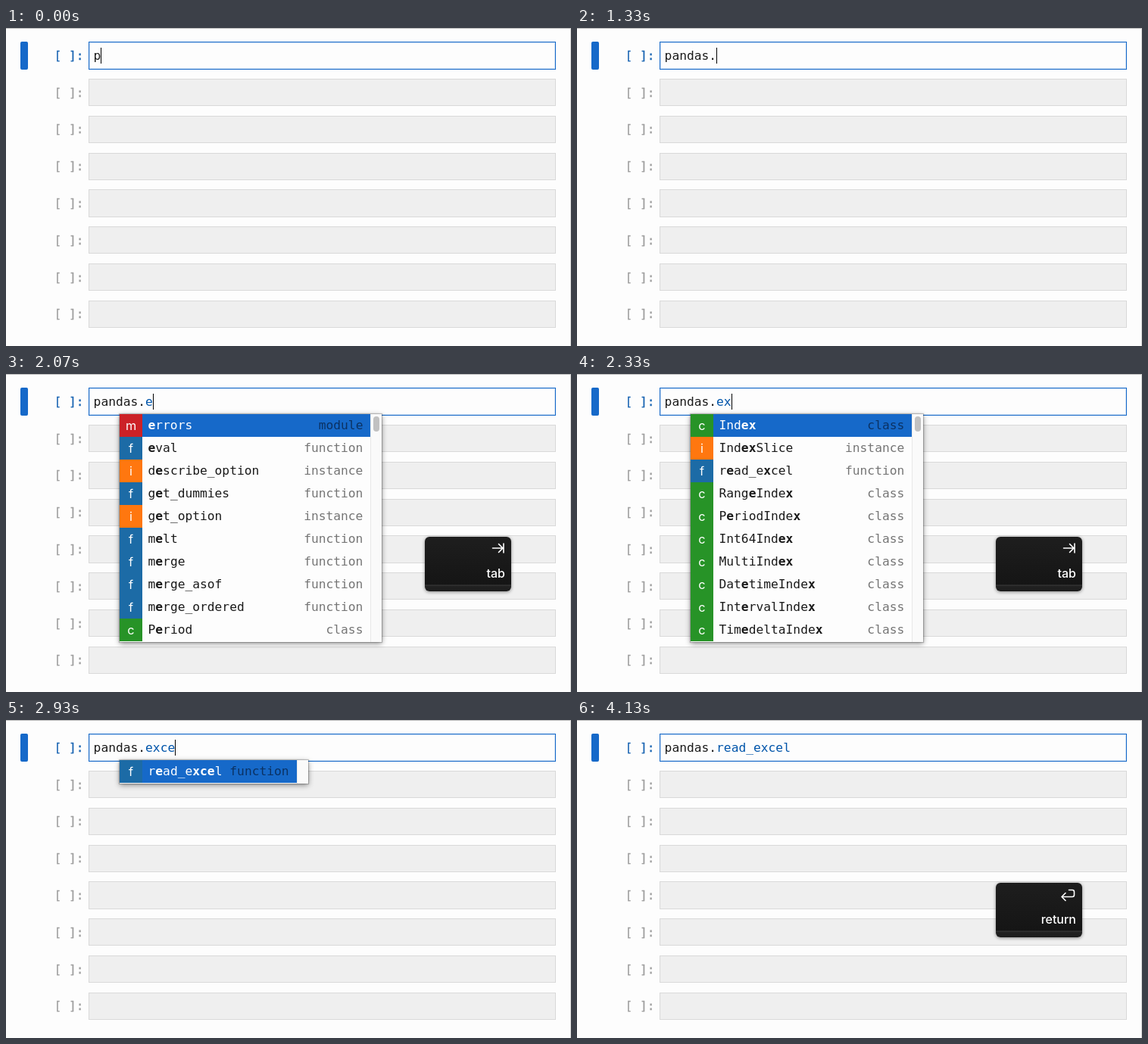
Recreate the animation shown at these times as an HTML page. Size 746 px wide and 420 px high, loop 4670 ms.

```html
<!DOCTYPE html>
<html lang="en">
<head>
<meta charset="utf-8">
<title>Notebook completion</title>
<style>
html, body { margin: 0; width: 100%; height: 100%; overflow: hidden; background: #fdfdfd; }
#stage { position: relative; width: 746px; height: 420px; overflow: hidden; box-sizing: border-box;
  border-top: 1px solid #bdbdbd; border-right: 1px solid #d2d2d2; color: #1a1a1a;
  font: 16.25px/37px "DejaVu Sans Mono", monospace; }
#stage div { position: absolute; box-sizing: border-box; white-space: nowrap; }
#scene { left: 0; top: -1px; width: 746px; height: 420px; }
#cells { left: 0; top: 0; }
.bar { left: 19px; top: 18px; width: 10px; height: 37px; border-radius: 2px; background: #1669c9; }
.prompt { left: 63.4px; color: #a0a0a0; -webkit-text-stroke: .3px; }
.cell { left: 109px; width: 617px; height: 36.2px; background: #efefef; border: 1px solid #d9d9d9; }
.prompt.active { color: #1f68b4; }
.cell.active { height: 37px; background: #fdfdfd; border-color: #1669c9;
  box-shadow: inset 0 0 0 1px rgba(22, 105, 201, .2); }
#code { left: 115.6px; top: 18px; }
#code span { color: #05a; }
#caret { top: 26px; width: 1px; height: 21px; background: #000; }
#menu { left: 150px; top: 53px; background: #fdfdfd; line-height: 30px;
  box-shadow: 0 0 1px 1px rgba(0, 0, 0, .2), 0 2px 7px rgba(0, 0, 0, .45); }
.item { left: 0; right: 15px; height: 30px; }
.item div { top: 0; height: 30px; }
.icon { left: 0; width: 30px; color: #fff; text-align: center; font-family: Inter, sans-serif; }
.label { left: 37.5px; }
.kind { right: 10px; color: #757575; }
.item.on { background: #1669c9; color: #fff; }
.on .kind { color: #0b3263; }
.track { right: 0; top: 0; bottom: 0; width: 15px; background: #fafafa; border-left: 1px solid #e8e8e8; }
.thumb { right: 3px; top: 3px; width: 8px; height: 20px; border-radius: 4px; background: #c1c1c1; }
#key { left: 553px; top: 215px; width: 114px; height: 72px; border-radius: 6px; color: #fff;
  background: linear-gradient(#1e1e1e, #151515 63px, #3c3c3c 64px, #222 65px, #1c1c1c);
  box-shadow: 0 1px 4px rgba(0, 0, 0, .45); transform-origin: 50% 100%;
  font: 500 16px/20px Inter, sans-serif; }
#name { right: 8px; top: 38px; }
#key svg { position: absolute; left: 0; top: 0; fill: none; stroke: #fff; stroke-width: 1.6;
  stroke-linecap: round; stroke-linejoin: round; }
</style>
</head>
<body>
<div id="stage"><div id="scene">
  <div class="bar"></div>
  <div id="cells"></div>
  <div id="code"></div>
  <div id="caret"></div>
  <div id="menu"></div>
  <div id="key"><svg width="114" height="72"><path id="glyph"/></svg><div id="name"></div></div>
</div></div>
<script>
const LOOP = 4670, CHAR = 9.783, MENU_OPEN = 1530, BLINK = 530;
const $ = id => document.getElementById(id);

const typing = [
  [0, 'p'], [70, 'pa'], [470, 'pan'], [540, 'pand'], [670, 'panda'], [800, 'pandas'],
  [1270, 'pandas.'], [2070, 'pandas.e'], [2270, 'pandas.ex'], [2470, 'pandas.exc'],
  [2670, 'pandas.exce'], [3130, 'pandas.excel'], [3600, 'pandas.read_excel']
];
const kinds = {
  m: ['module', '#cc2127'], f: ['function', '#1c6ba6'],
  c: ['class', '#279327'], i: ['instance', '#ff770f']
};
// Each menu: longest label in the whole list, then the visible entries.
const single = [10, 'f:read_excel'];
const menus = {
  '': [20, 'm:api f:array m:arrays f:bdate_range c:BooleanDtype c:Categorical c:CategoricalDtype c:CategoricalIndex m:compat f:concat'],
  e: [20, 'm:errors f:eval i:describe_option f:get_dummies i:get_option f:melt f:merge f:merge_asof f:merge_ordered c:Period'],
  ex: [16, 'c:Index i:IndexSlice f:read_excel c:RangeIndex c:PeriodIndex c:Int64Index c:MultiIndex c:DatetimeIndex c:IntervalIndex c:TimedeltaIndex'],
  exc: [10, 'f:read_excel i:IndexSlice'],
  exce: single,
  excel: single
};
const keys = [
  { name: 'tab', from: 1530, fade: 2500, to: 2830,
    path: 'M89.5 15H103M97.5 9.5L103 15L97.5 20.5M104 9V21' },
  { name: 'return', from: 3670, fade: LOOP, to: LOOP + 1,
    path: 'M96.5 9.5H101Q103.5 9.5 103.5 12V16Q103.5 18.5 101 18.5H87M92 13.5L87 18.5L92 23.5' }
];

// Bold the first in-order occurrence of each query letter.
function highlight(label, query) {
  let next = 0;
  return [...label].map(ch => ch === query[next] ? (next++, `<b>${ch}</b>`) : ch).join('');
}

function menuHTML(entries, query) {
  const rows = entries.map((entry, i) => {
    const [type, label] = entry.split(':'), [kind, color] = kinds[type];
    return `<div class="item ${i ? '' : 'on'}" style="top:${i * 30}px">` +
      `<div class="icon" style="background:${color}">${type}</div>` +
      `<div class="label">${highlight(label, query)}</div><div class="kind">${kind}</div></div>`;
  });
  return rows.join('') + '<div class="track"></div>' +
    (entries.length > 9 ? '<div class="thumb"></div>' : '');
}

function showText(text) {
  const [head, tail] = text.split('.');
  $('code').innerHTML = tail === undefined ? head : `${head}.<span>${tail}</span>`;
  $('caret').style.left = Math.round(115.7 + text.length * CHAR) + 'px';
}

function showMenu(query) {
  const menu = menus[query];
  $('menu').hidden = !menu;
  if (!menu) return;
  const entries = menu[1].split(' ');
  $('menu').style.width = 72.5 + (menu[0] + 8) * CHAR + 'px';
  $('menu').style.height = entries.length * 30 + 1 + 'px';
  $('menu').innerHTML = menuHTML(entries, query);
}

function showKey(t) {
  const key = keys.find(k => t >= k.from && t < k.to);
  $('key').hidden = !key;
  if (!key) return;
  const tilt = 15 * Math.max(0, 1 - (t - key.from) / 250);
  $('name').textContent = key.name;
  $('glyph').setAttribute('d', key.path);
  $('key').style.opacity = Math.min(1, (key.to - t) / (key.to - key.fade));
  $('key').style.transform = tilt ? `perspective(600px) rotateX(${tilt}deg)` : 'none';
}

let shown = '';
function render() {
  const t = performance.now() % LOOP;
  const [since, text] = typing.filter(step => step[0] <= t).pop();
  const query = t >= MENU_OPEN ? text.split('.')[1] : undefined;
  const state = text + '|' + query;
  if (state !== shown) {
    showText(text);
    showMenu(query);
    shown = state;
  }
  $('caret').hidden = t - since >= BLINK;
  showKey(t);
  requestAnimationFrame(render);
}

$('cells').innerHTML = Array.from({ length: 8 }, (_, i) => {
  const top = 18.2 + i * 48.8, active = i ? '' : 'active';
  return `<div class="prompt ${active}" style="top:${top - 0.4}px">[&nbsp;]:</div>` +
    `<div class="cell ${active}" style="top:${top}px"></div>`;
}).join('');
render();
</script>
</body>
</html>
```
